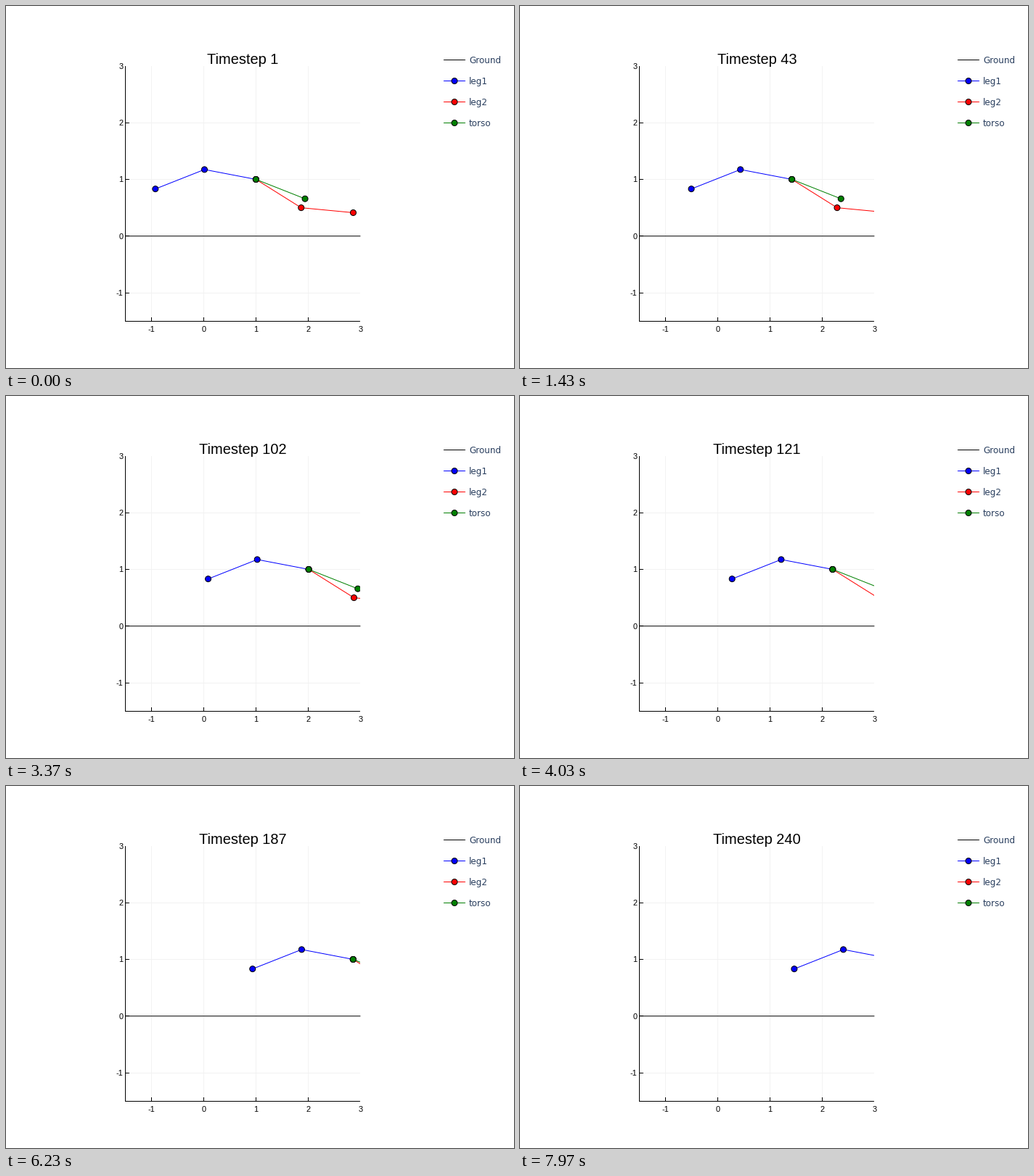
Write a matplotlib script that moves like this. It is 700 by 500 pixels and loops after 8 s.

```python
from math import cos, sin, radians

import matplotlib.pyplot as plt
from matplotlib.animation import FuncAnimation
from matplotlib.patches import Circle, Rectangle

W, H, DPI = 700, 500, 100
PT = 72 / DPI                      # points per pixel
STEPS, LOOP_MS = 240, 8000

LEFT, RIGHT, TOP, BOTTOM = 164.4, 488.4, 82.8, 435.3
X_ORIGIN, X_UNIT = 272.4, 72.0
Y_ORIGIN, Y_UNIT = 317.8, 78.33

fig = plt.figure(figsize=(W / DPI, H / DPI), dpi=DPI, facecolor="white")
ax = fig.add_axes([0, 0, 1, 1])
ax.set_xlim(0, W)
ax.set_ylim(H, 0)
ax.axis("off")


def sx(x):
    return X_ORIGIN + X_UNIT * x


def sy(y):
    return Y_ORIGIN - Y_UNIT * y


def stroke(xs, ys, color="black", snap=False, z=1):
    line, = ax.plot(xs, ys, color=color, lw=PT, snap=snap, zorder=z,
                    solid_capstyle="butt", solid_joinstyle="round")
    return line


def dot(x, y, color, z):
    return ax.add_patch(Circle((x, y), 4, fc=color, ec="black", lw=PT,
                               zorder=z))


def label(x, y, s, size, font="Liberation Sans", color="black"):
    return ax.text(x, y, s, fontsize=size * PT, family=font, color=color,
                   ha="left", va="baseline")


def number_width(n):
    return 6.12 + (3.66 if n < 0 else 0)


# Grid, ticks and tick labels
for v in range(-1, 4):
    px, py = int(sx(v)) + 0.5, int(sy(v)) + 0.5
    if v < 3:
        stroke([px, px], [83, 435], "#f2f2f2", z=0)
        stroke([165, 488], [py, py], "#f2f2f2", z=0)
        stroke([px, px], [430, 435])
        stroke([165, 170], [py, py])
    w = number_width(v)
    label(sx(v) - w / 2, 450, str(v), 11)
    label(161.4 - w, round(sy(v) + 3.9), str(v), 11)

# Axis lines and ground
stroke([164.5, 164.5], [83, 436])
stroke([164, 488], [435.5, 435.5])
stroke([LEFT, RIGHT], [Y_ORIGIN, Y_ORIGIN], z=2)

# Legend
entries = [("Ground", "black"), ("leg1", "blue"), ("leg2", "red"),
           ("torso", "green")]
for i, (name, color) in enumerate(entries):
    y = 74.5 + 29 * i
    stroke([603, 633], [y, y], color)
    if i:
        dot(618, y, color, 2)
    label(638, y + 4.5, name, 12, "DejaVu Sans", "#2a3f5f")


def chain(*links):
    """Joint offsets from the hip for links given as (angle, direction)."""
    pts = [(0.0, 0.0)]
    for deg, side in links:
        x, y = pts[-1]
        pts.append((x + side * cos(radians(deg)), y + sin(radians(deg))))
    return pts


window = Rectangle((LEFT, TOP), RIGHT - LEFT, BOTTOM - TOP,
                   transform=ax.transData)


class Limb:
    def __init__(self, joints, color, z):
        self.joints = joints
        self.line = stroke([], [], color, z=z)
        self.dots = [dot(0, 0, color, z + 1) for _ in joints]
        for artist in [self.line, *self.dots]:
            artist.set_clip_path(window)

    def place(self, hip_x, hip_y):
        pts = [(sx(hip_x + x), sy(hip_y + y)) for x, y in self.joints]
        self.line.set_data(*zip(*pts))
        for circle, p in zip(self.dots, pts):
            circle.center = p


limbs = [
    Limb(chain((10, -1), (-20, -1)), "blue", 4),
    Limb(chain((-30, 1), (-5, 1)), "red", 6),
    Limb(chain((-20, 1)), "green", 8),
]
title = label(277, 80, "", 20)


def draw(i):
    step = str(i + 1)
    title.set_text("Timestep " + step)
    title.set_x(277.2 - 5.56 * (len(step) - 1))
    for limb in limbs:
        limb.place(1 + 0.01 * i, 1)
    return []


anim = FuncAnimation(fig, draw, frames=STEPS, interval=LOOP_MS / STEPS,
                     init_func=lambda: draw(0), repeat=True, repeat_delay=0,
                     blit=False)
plt.show()
```
